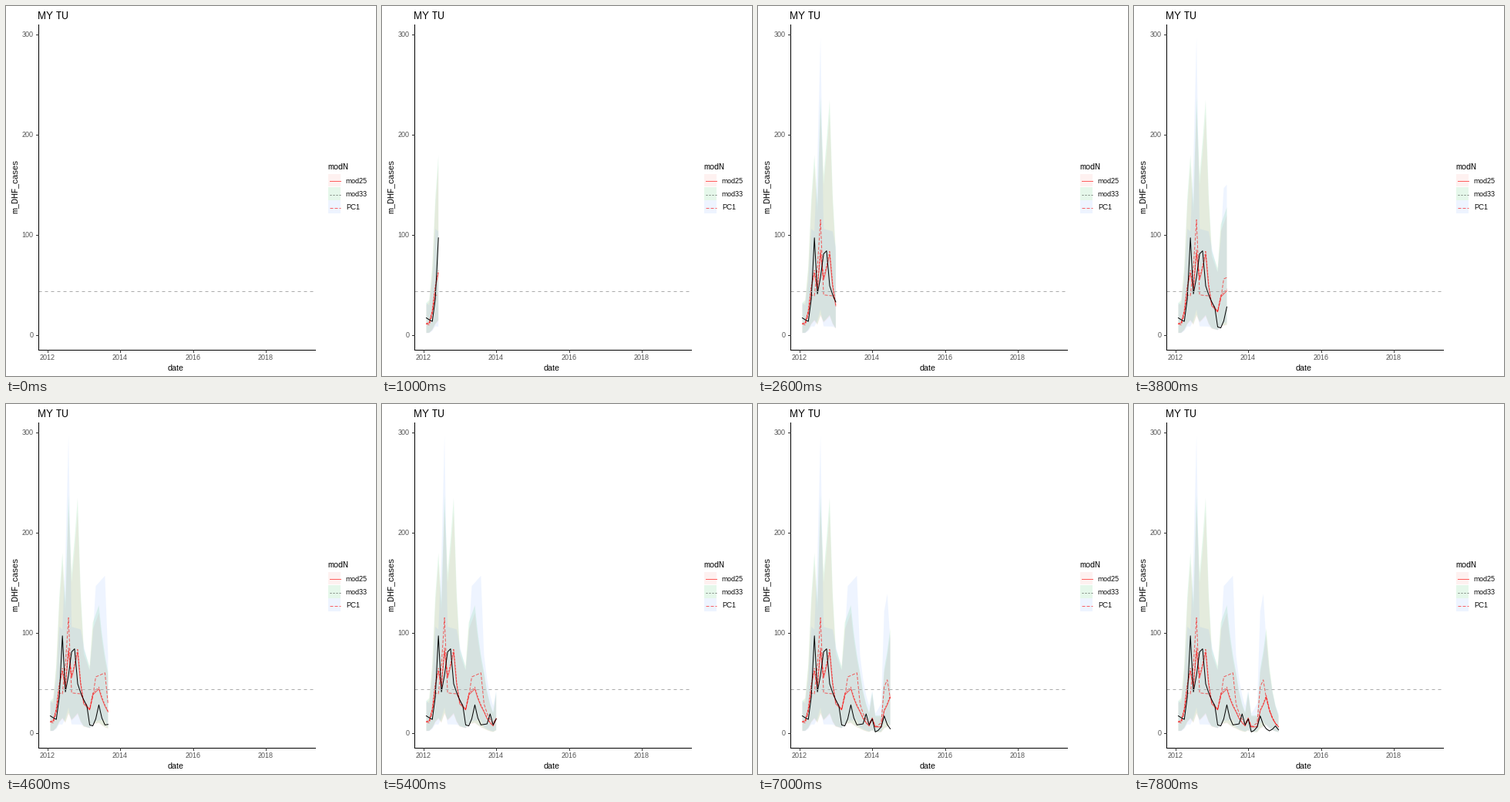
Animation of 480 by 480 pixels, one loop 8 s. Source, as a matplotlib script:

```python
import numpy as np
import matplotlib.pyplot as plt
from matplotlib.animation import FuncAnimation
from matplotlib.patches import Polygon, Rectangle

PX = 72 / 80  # points per pixel
plt.rcParams["font.family"] = "Liberation Sans"
plt.rcParams["text.hinting"] = "default"
plt.rcParams["text.hinting_factor"] = 1

fig = plt.figure(figsize=(6, 6), dpi=80, facecolor="white")
ax = fig.add_axes([0, 0, 1, 1])
ax.set_xlim(0, 480)
ax.set_ylim(480, 0)
ax.axis("off")

# Panel geometry in pixels
LEFT, RIGHT, TOP, BOTTOM = 41.5, 401, 24, 445.5
YEAR0, DAY = 53.5, 0.1295
ZERO, UNIT = 426.7, 1.2985
START = np.datetime64("2012-01-01")
SPAN, STEPS = 2526, 99  # days covered and frames of the full reveal

RED, GREEN, BLUE = "#F8766D", "#00BA38", "#619CFF"
FILL_ALPHA = 0.1
LINE = dict(color="red", alpha=0.6)
DOTS, DASHES = (0, (2, 2)), (0, (4, 2))


def xpix(date):
    return YEAR0 + DAY * (date - START).astype(float)


def ypix(v):
    return ZERO - UNIT * v


def line(xs, ys, color="black", **kw):
    return ax.plot(xs, ys, color=color, lw=PX, dash_capstyle="butt", **kw)[0]


def label(x, y, s, size, color="black", **kw):
    return ax.text(x, y, s, fontsize=size * PX, color=color, **kw)


months = np.arange("2012-02", "2014-12", dtype="datetime64[M]")
dates = months.astype("datetime64[D]")
xs = xpix(dates)
reach = np.rint((dates - dates[0]).astype(float) / SPAN * STEPS)


def growth(*turns):
    """Monthly counts growing or decaying exponentially between turns."""
    at, v = np.transpose(turns)
    return np.exp(np.interp(np.arange(len(months)), at, np.log(v)))


cases = growth((0, 17), (2, 13.5), (4, 97), (5, 41), (7, 81), (8, 84),
               (9, 49), (12, 27), (13, 8), (14, 7), (16, 28), (18, 8),
               (20, 9), (21, 19), (22, 8), (23, 14), (24, 1), (26, 6),
               (27, 17), (30, 2), (32, 7), (33, 3))
mod25 = growth((0, 11), (1, 12), (3, 47), (4, 62), (5, 45), (6, 82),
               (7, 55), (9, 81), (11, 29), (13, 23), (14, 38), (16, 44),
               (19, 21), (22, 7), (23, 14), (24, 6), (26, 6), (27, 22),
               (29, 36), (33, 6))
pc1 = growth((0, 11), (1, 10), (3, 40), (4, 39), (6, 115), (7, 40),
             (10, 39), (13, 23), (15, 56), (18, 60), (19, 29), (22, 9),
             (23, 15), (24, 6), (26, 10), (27, 46), (28, 53), (33, 6))
mod33 = 1.04 * mod25

# Ribbons, model lines, observed cases
bands = []
for up, color in ((2.72 * mod25, RED), (2.9 * mod25, GREEN),
                  (2.55 * pc1 + 4, BLUE)):
    patch = Polygon([(0, 0)] * 3, facecolor=color, alpha=FILL_ALPHA, lw=0)
    ax.add_patch(patch)
    low = np.maximum(0.3, 0.088 * up - 0.8)
    bands.append((patch, ypix(up), ypix(low)))

curves = [(line([], [], linestyle=style, **LINE), ypix(v))
          for v, style in ((mod25, "-"), (mod33, DOTS), (pc1, DASHES))]
curves.append((line([], []), ypix(cases)))

line([LEFT, RIGHT], [369.5, 369.5], "#ABABAB", linestyle=(0, (4, 4)))

# Axes
line([LEFT, LEFT], [TOP, BOTTOM])
line([LEFT, RIGHT], [BOTTOM, BOTTOM])
for v in (0, 100, 200, 300):
    y = ypix(v)
    line([38.5, LEFT], [y, y], "#333333")
    label(35.4, y + 3.3, str(v), 9, "#4D4D4D", ha="right")
for year in range(2012, 2020, 2):
    x = xpix(np.datetime64(f"{year}-01-01"))
    line([x, x], [BOTTOM, 448.5], "#333333")
    label(x - 0.4, 458.6, str(year), 9, "#4D4D4D", ha="center")

label(40.6, 16.6, "MY TU", 13.2)
label(220.5, 472.6, "date", 11, ha="center")
label(15, 234, "m_DHF_cases", 11.2, rotation=90,
      rotation_mode="anchor", ha="center")

# Legend
label(417.6, 212, "modN", 11)
keys = (("mod25", RED, "-", LINE),
        ("mod33", GREEN, DOTS, dict(color="#7C857E")),
        ("PC1", BLUE, DASHES, LINE))
for i, (name, color, style, look) in enumerate(keys):
    y = 217.8 + 17.28 * i
    ax.add_patch(Rectangle((418, y), 16.3, 16.6, facecolor=color,
                           alpha=FILL_ALPHA, lw=0))
    mid = np.rint(y + 8.64) + 0.5
    line([419.5, 433.5], [mid, mid], linestyle=style, **look)
    label(440.8, y + 12, name, 9)


def update(frame):
    past = reach < frame

    def reveal(v):
        return np.append(v[past], np.interp(frame, reach, v))

    x = reveal(xs)
    for patch, top, bottom in bands:
        hi, lo = reveal(top), reveal(bottom)
        patch.set_xy(np.column_stack([np.append(x, x[::-1]),
                                      np.append(hi, lo[::-1])]))
        patch.set_visible(frame > 0)
    for curve, v in curves:
        curve.set_data(x, reveal(v))
        curve.set_visible(frame > 0)
    return [b[0] for b in bands] + [c[0] for c in curves]


anim = FuncAnimation(fig, update, frames=40, interval=200,
                     repeat=True, repeat_delay=0, blit=False)
plt.show()
```
